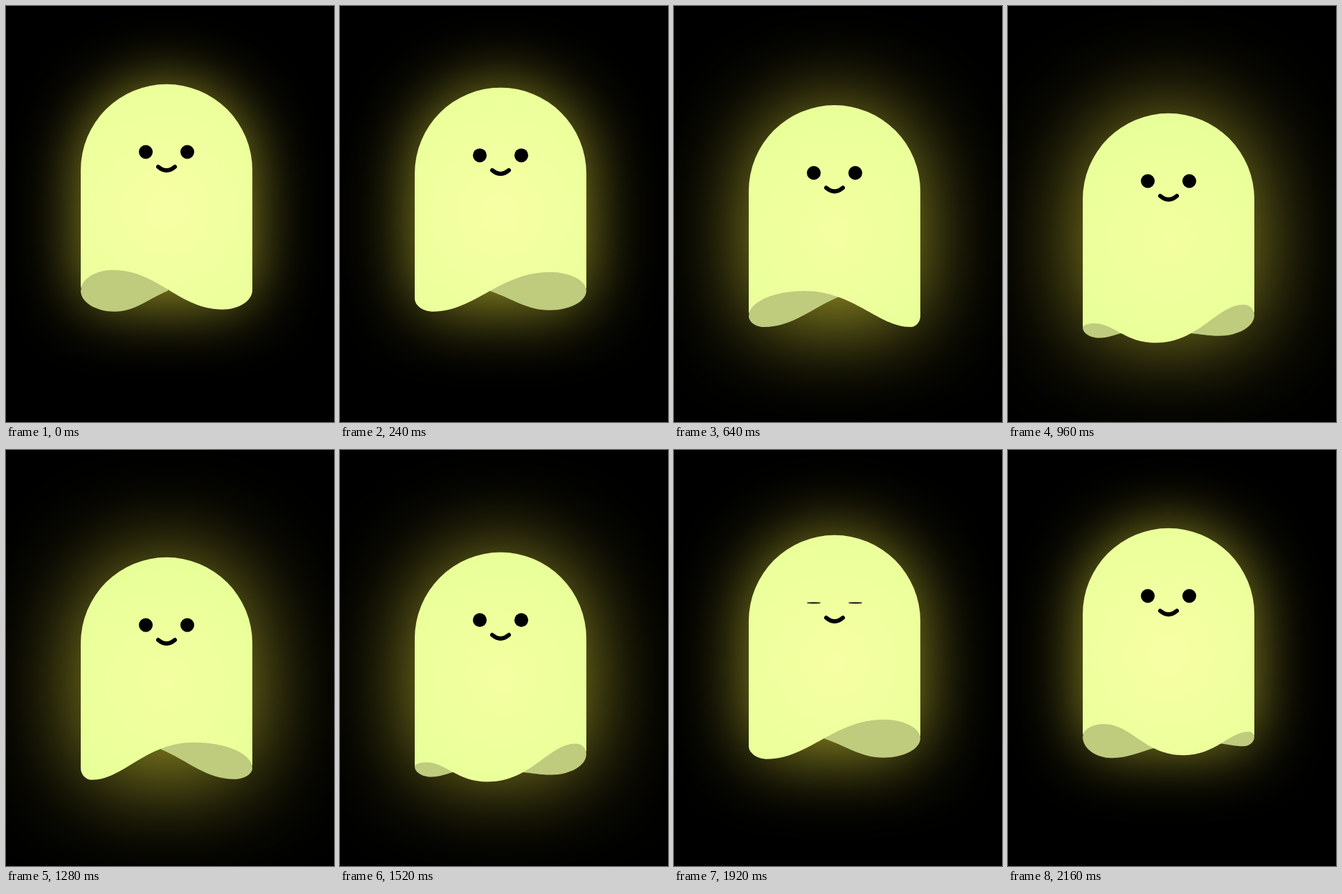
Write an HTML page with a canvas that moves like this. It is 474x600 px and loops after 2.24 s.

```html
<!DOCTYPE html>
<html lang="en">
<head>
<meta charset="utf-8">
<title>Glowing ghost</title>
<style>
  html, body { margin: 0; width: 100%; height: 100%; overflow: hidden; background: #000; }
  canvas { display: block; }
</style>
</head>
<body>
<canvas id="stage" width="474" height="600"></canvas>
<script>
const ctx = document.getElementById('stage').getContext('2d');
const STEP = 80, STEPS = 28, HALF = 14;
const CX = 232, R = 124;

// Height of the head while sinking; the way up mirrors it.
const BOB = [112.8, 112.8, 114.4, 117.7, 122.8, 128.4, 133.7, 138.4,
             143, 147.6, 151.2, 153.5, 154.8, 155.7, 156];

const BLINK = { 22: 0.9, 23: 0.4, 24: 0.1, 25: 0.5, 26: 0.95 };

// Hem poses: side heights, turning points of the front edge, and for each
// visible fold its lowest point followed by where it slips behind the front.
const HEM = [
  { ends: [298, 297], front: [[-77, 268], [81, 325]], left: [-75, 328, 2, 298] },
  { ends: [304, 304], front: [[-44, 268], [110, 320]], left: [-102, 320, 7, 276] },
  { ends: [304, 304], front: [[-108, 321], [40, 267]], right: [98, 320, -8, 277] },
  { ends: [304, 293], front: [[-97, 323], [71, 266]], right: [71, 321, -16, 293] },
  { ends: [305, 296], front: [[-58, 327], [90, 270]], right: [74, 322, 5, 308] },
  { ends: [309, 291], front: [[-107, 303], [-19, 331], [109, 276]],
    left: [-100, 324, -67, 317], right: [73, 321, 30, 317] },
  { ends: [301, 301], front: [[-94, 282.5], [22, 327.5], [115, 293.5]],
    left: [-82, 331.5, -18, 316.5], right: [108, 314.5, 75, 310.5] }
];

const mix = (a, b, k) => a + (b - a) * k;

// Waves look tighter where the cloth turns away at the sides.
const reach = x => 0.5 - 0.25 * (x / R) ** 2;

// Quarter turn from a vertical side into a level point.
function roundIn(p, x0, y0, x, y) {
  p.bezierCurveTo(x0, mix(y0, y, 0.55), mix(x, x0, 0.55), y, x, y);
}

function roundOut(p, x, y, x1, y1) {
  p.bezierCurveTo(mix(x, x1, 0.55), y, x1, mix(y1, y, 0.55), x1, y1);
}

function bodyPath({ ends, front }) {
  const p = new Path2D();
  p.arc(0, R, R, 0, Math.PI, true);
  p.lineTo(-R, ends[0]);
  let [x, y] = front[0];
  roundIn(p, -R, ends[0], x, y);
  for (const [nx, ny] of front.slice(1)) {
    const dx = nx - x;
    p.bezierCurveTo(x + dx * reach(x), y, nx - dx * reach(nx), ny, nx, ny);
    x = nx;
    y = ny;
  }
  roundOut(p, x, y, R, ends[1]);
  p.closePath();
  return p;
}

function foldPath(side, endY, [x, y, tx, ty]) {
  const p = new Path2D();
  const edge = side * R, inner = side * (R - 1), top = endY - 45;
  p.moveTo(inner, top);
  p.lineTo(inner, endY - 4);
  p.lineTo(edge, endY);
  roundIn(p, edge, endY, x, y);
  p.bezierCurveTo(mix(x, tx, 0.38), y, mix(x, tx, 0.62), mix(y, ty, 0.6), tx, ty);
  p.lineTo(tx, top);
  p.closePath();
  return p;
}

const poses = HEM.map(hem => ({
  body: bodyPath(hem),
  folds: [
    hem.left && foldPath(-1, hem.ends[0], hem.left),
    hem.right && foldPath(1, hem.ends[1], hem.right)
  ].filter(Boolean)
}));

const halo = bodyPath({ ends: [290, 290], front: [[-80, 318], [80, 318]] });

function drawGlow(k) {
  ctx.save();
  ctx.filter = `blur(${mix(47, 72, k)}px)`;
  ctx.fillStyle = `rgba(250, 243, 62, ${mix(0.6, 0.63, k)})`;
  ctx.fill(halo);
  ctx.restore();
}

function drawBody({ body, folds }, k) {
  ctx.fillStyle = '#bfcb7d';
  folds.forEach(f => ctx.fill(f));
  const light = ctx.createRadialGradient(0, 182, 0, 0, 182, mix(230, 185, k));
  light.addColorStop(0, `rgb(${mix(247, 243, k)}, 255, ${mix(164, 160, k)})`);
  light.addColorStop(1, '#e7ff98');
  ctx.fillStyle = light;
  ctx.fill(body);
}

function drawFace(open) {
  ctx.fillStyle = ctx.strokeStyle = '#000';
  for (const x of [-30, 30]) {
    ctx.beginPath();
    ctx.ellipse(x, 97.7, 10, 10 * open, 0, 0, 2 * Math.PI);
    ctx.fill();
  }
  ctx.lineWidth = 6;
  ctx.lineCap = 'round';
  ctx.beginPath();
  ctx.moveTo(-12, 119.2);
  ctx.quadraticCurveTo(0, 129.4, 12, 119.2);
  ctx.stroke();
}

function draw(step) {
  const y = BOB[step <= HALF ? step : STEPS - step];
  const k = (y - BOB[0]) / (BOB[HALF] - BOB[0]);
  ctx.setTransform(1, 0, 0, 1, 0, 0);
  ctx.fillStyle = '#000';
  ctx.fillRect(0, 0, 474, 600);
  ctx.translate(CX, y);
  drawGlow(k);
  drawBody(poses[step % HEM.length], k);
  drawFace(BLINK[step] ?? 1);
}

const start = performance.now();
let shown = -1;

function tick() {
  const step = Math.floor((performance.now() - start) / STEP) % STEPS;
  if (step !== shown) draw(shown = step);
  requestAnimationFrame(tick);
}
tick();
</script>
</body>
</html>
```
